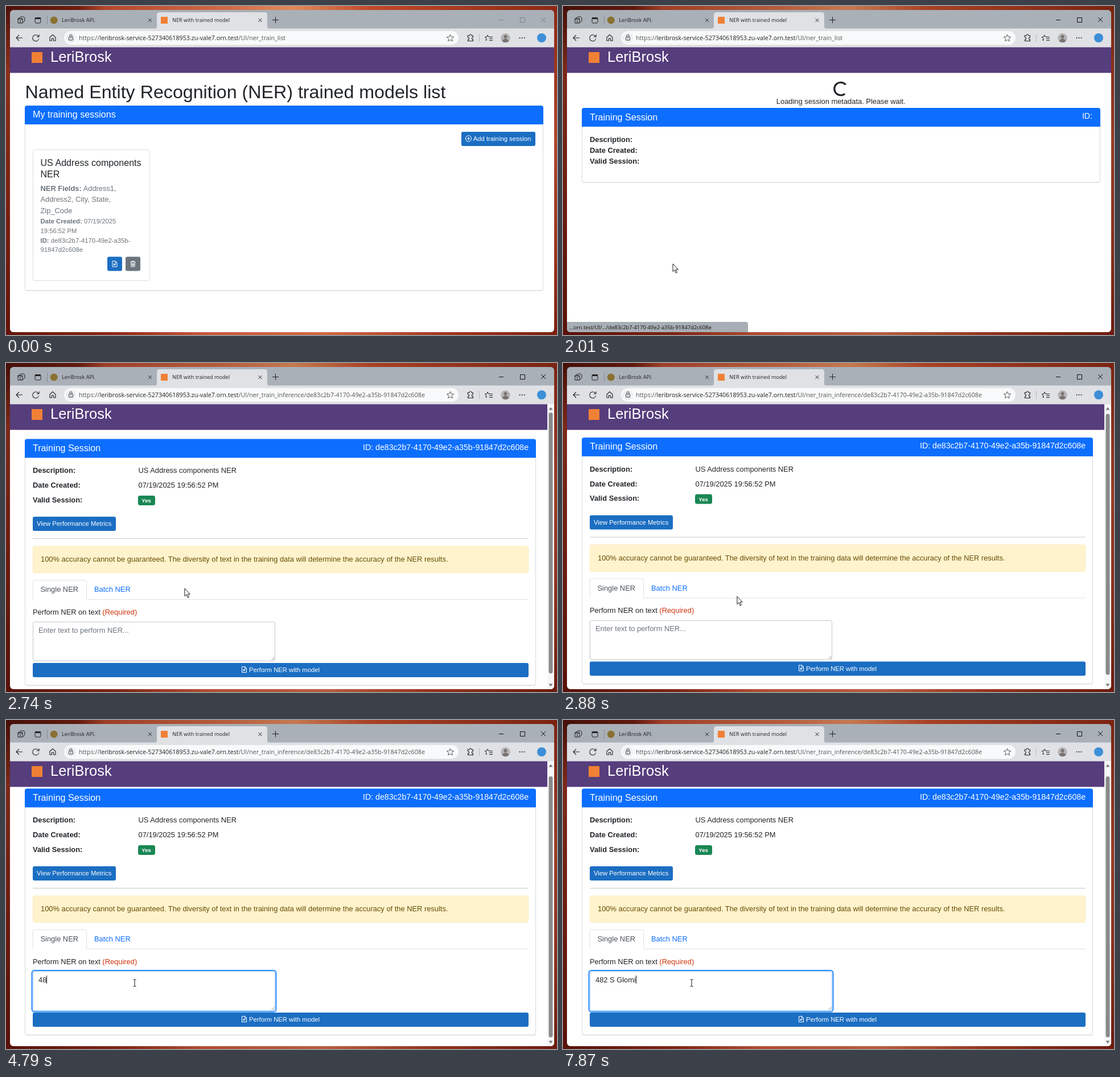
Recreate the animation shown at these times as an HTML page. Size 968x578 px, loop 8 s.

```html
<!DOCTYPE html>
<html lang="en">
<head>
<meta charset="utf-8">
<title>Training session demo</title>
<style>
html, body { margin: 0; width: 100%; height: 100%; overflow: hidden; background: #8c2f1c; }
svg { display: block; width: 968px; height: 578px; }
text { font-family: "Liberation Sans", Arial, sans-serif; white-space: pre; }
.ui { font-family: "Open Sans", "Noto Sans", sans-serif; }
.b { font-weight: bold; }
</style>
</head>
<body>
<svg id="stage" viewBox="0 0 968 578" xmlns="http://www.w3.org/2000/svg"></svg>
<script>
const LOOP = 8000;
const BRAND = 'LeriBrosk';
const HOST = 'leribrosk-service-527340618953.zu-vale7.orn.test';
const ID_HEAD = 'de83c2b7-4170-49e2-a35b-', ID_TAIL = '91847d2c608e';
const ID = ID_HEAD + ID_TAIL;
const INK = '#212529', BLUE = '#1b6ec2', HEAD = '#0d6efd', MUTED = '#6c757d';
const BODY = 12.88, TITLE = 16.1, SMALL = 11.27;

// Markup helpers
const rect = (x, y, w, h, fill, r = 0, more = '') =>
  `<rect x="${x}" y="${y}" width="${w}" height="${h}" rx="${r}" fill="${fill}" ${more}/>`;
const text = (x, y, size, str, fill = INK, more = '') =>
  `<text x="${x}" y="${y}" font-size="${size}" fill="${fill}" ${more}>${str}</text>`;
const bold = (x, y, size, str, fill = INK) => text(x, y, size, str, fill, 'class="b"');
const ui = (x, y, size, str, fill = '#222', more = '') =>
  text(x, y, size, str, fill, `class="ui" ${more}`);
const line = (d, color = '#222', w = 1, more = '') =>
  `<path d="${d}" fill="none" stroke="${color}" stroke-width="${w}" ${more}/>`;
const circle = (x, y, r, fill, more = '') =>
  `<circle cx="${x}" cy="${y}" r="${r}" fill="${fill}" ${more}/>`;
const group = (id, inner, more = '') => `<g id="${id}" ${more}>${inner}</g>`;
const gradient = (id, dir, stops) => `<linearGradient id="${id}" x1="0" y1="0" ${dir}="1" ${dir === 'y2' ? 'x2="0"' : 'y2="0"'}>` +
  stops.map(([o, c]) => `<stop offset="${o}" stop-color="${c}"/>`).join('') + '</linearGradient>';
const cross = (x, y, s, color) =>
  line(`M${x - s} ${y - s}l${2 * s} ${2 * s}m0 ${-2 * s}l${-2 * s} ${2 * s}`, color);
const docIcon = (x, y) =>
  line(`M${x} ${y}h5.2l2.8 2.8v7.2h-8zM${x + 5} ${y}v3h3M${x + 2.5} ${y + 8}v-3h3v1.6h-3`, '#fff', 1);
const panel = (x, y, w, h) =>
  rect(x - .5, y + 1, w + 1, h + 1, '#000', 4, 'opacity=".06"') +
  rect(x, y, w, h, '#fff', 3.5, 'stroke="#d9dbdd"') +
  `<path d="M${x - .5} ${y + 32.5}v-29q0-4 4-4h${w - 7}q4 0 4 4v29z" fill="${HEAD}"/>`;

const wallpaper =
  rect(0, 0, 968, 578, 'url(#side)') +
  rect(0, 0, 968, 8, 'url(#top)') +
  rect(0, 572, 968, 6, 'url(#bottom)') +
  rect(962, 0, 6, 578, 'url(#right)');

const tabs =
  rect(7, 7, 956, 33, '#a9b0b7') +
  line('M22 22l4-3h5l2 2v5l-4 4M21 22h8v8h-8zM21 24l4-2 4 2M25 24v6', '#222') +
  rect(51, 20.5, 10, 9.5, 'none', 2, 'stroke="#222"') + rect(51, 20, 10, 3, '#222', 1) +
  line('M72.5 17v16', '#858b92') +
  circle(84.2, 25, 6.5, '#8a7032') +
  ui(98, 28.3, 9.2, BRAND + ' API.') + cross(253, 25, 3, '#333') +
  '<path d="M261 40q4 0 4-4V16q0-5 5-5h184q5 0 5 5v20q0 4 4 4z" fill="#dfe1e5"/>' +
  rect(272, 19, 12, 12, '#f08035') +
  ui(292, 28.3, 9.2, 'NER with trained model') + cross(446.5, 25, 3, '#222') +
  line('M468 24.5h11m-5.5-5.5v11', '#222') +
  group('controls', '<path d="M866 24.5h8M903.5 20.5h8v8h-8zM940 20l8 8m0-8l-8 8"/>', 'fill="none"');

const toolbar =
  rect(7, 39.5, 956, 33, '#dfe1e5') +
  line('M29 56H18m5-5l-5 5 5 5', '#222', 1.1) +
  line('M57 53.5a5.5 5.5 0 1 0 .6 4M58 50v4h-4', '#222', 1.1) +
  line('M77 55l5-4.5 5 4.5v6h-3.4v-4h-3.2v4h-3.4z', '#222', 1.1) +
  rect(102, 44, 693, 24, '#f8f9fa', 12) +
  circle(114, 56, 9, '#eceef0') +
  rect(110.5, 54.5, 7, 5.5, 'none', 1, 'stroke="#333"') + line('M112 54v-1.5a2 2 0 0 1 4 0v1.5', '#333') + circle(114, 57.2, .8, '#333') +
  ui(128, 59.6, 10.69, `https://<tspan fill="#222">${HOST}</tspan><tspan id="path"></tspan>`, '#555') +
  line('M780.5 50l1.8 4 4.3.5-3.2 2.9.9 4.3-3.8-2.2-3.8 2.2.9-4.3-3.2-2.9 4.3-.5z', '#555') +
  line('M811 52h3a2 2 0 0 1 4 0h2.5v3a2 2 0 0 0 0 4v2.5h-9v-2.5a2 2 0 0 0 0-4z', '#222', 1.1) +
  line('M831.5 49v14', '#b5b9be') +
  line('M846 51l1.4 3 3.2.4M846 51l-1.5 3.2-3.3.4 2.6 2.3-.7 3.6 2-1.2M849 54.5h6m-6 3h6m-6 3h6', '#222') +
  circle(877.5, 56.3, 8.3, '#b6b4b4') + circle(877.5, 53.8, 2.9, '#77716f') +
  '<path d="M872 62a5.5 4.4 0 0 1 11 0q-5.500 4-11 0z" fill="#77716f"/>' +
  [902.500, 906.5, 910.5].map(x => circle(x, 56, 1, '#222')).join('') +
  circle(941, 56, 8, '#3c8fd8');

const fact = (y, label, value = '') => bold(47, y, BODY, label) + text(232.5, y, BODY, value);

const listPage =
  text(33.500, 162.3, 32.2, 'Named Entity Recognition (NER) trained models list') +
  panel(33.5, 175.5, 910, 324) +
  text(47, 196.3, TITLE, 'My training sessions', '#fff') +
  rect(800, 221, 130, 25, BLUE, 3) +
  circle(812.5, 233, 5.2, 'none', 'stroke="#fff"') + line('M809.5 233h6m-3-3v6', '#fff') +
  text(820.8, 237.2, SMALL, 'Add training session', '#fff') +
  rect(47.5, 252.5, 205, 230, '#fff', 3.5, 'stroke="#dcdddf"') +
  text(60.5, 281, TITLE, 'US Address components') + text(60.5, 300.5, TITLE, 'NER') +
  text(60.5, 325, BODY, '<tspan class="b">NER Fields:</tspan> Address1,', MUTED) +
  text(60.5, 344.3, BODY, 'Address2, City, State,', MUTED) +
  text(60.5, 363.6, BODY, 'Zip_Code', MUTED) +
  text(60.5, 381.7, SMALL, '<tspan class="b">Date Created:</tspan> 07/19/2025', MUTED) +
  text(60.5, 398.6, SMALL, '19:56:52 PM', MUTED) +
  text(60.5, 415.5, SMALL, `<tspan class="b">ID:</tspan> ${ID_HEAD}`, MUTED) +
  text(60.5, 432.4, SMALL, ID_TAIL, MUTED) +
  rect(178, 440.5, 26, 25, BLUE, 3, 'id="open"') + docIcon(187, 448) +
  rect(210, 440.5, 26, 25, MUTED, 3) +
  line('M218.500 449.500h9m-6 0v-1.500h3v1.500M219.500 450l.5 8h6l.5-8M221.500 451.500v5m1.500-5v5m1.500-5v5', '#fff', 1);

const loadingPage =
  line('M495.950 137.550A11.250 11.250 0 1 0 495.950 153.450', INK, 3.2, 'id="spinner"') +
  text(488.3, 172, BODY, 'Loading session metadata. Please wait.', INK, 'text-anchor="middle"') +
  panel(33.5, 179.5, 910, 130) +
  text(47, 200.5, TITLE, 'Training Session', '#fff') +
  text(930, 198, 14.15, 'ID:', '#fff', 'text-anchor="end"') +
  fact(238.5, 'Description:') + fact(258, 'Date Created:') + fact(277.3, 'Valid Session:');

const sessionPage =
  panel(33.5, 134, 897, 432) +
  text(47, 155, TITLE, 'Training Session', '#fff') +
  text(918, 153, 14.15, 'ID: ' + ID, '#fff', 'text-anchor="end"') +
  fact(193.3, 'Description:', 'US Address components NER') +
  fact(219.2, 'Date Created:', '07/19/2025 19:56:52 PM') +
  fact(245, 'Valid Session:') +
  rect(232, 233, 30, 17, '#198754', 3.5) + bold(238.3, 245.2, 9.66, 'Yes', '#fff') +
  rect(47, 270, 146, 25, BLUE, 3) + text(54, 286.3, SMALL, 'View Performance Metrics', '#fff') +
  line('M47 308.500H918', '#c7c8ca') +
  rect(47.5, 322, 870, 46.5, '#fff3cd', 3, 'stroke="#fcecb9"') +
  text(61, 349.3, BODY, '100% accuracy cannot be guaranteed. The diversity of text in the training data will determine the accuracy of the NER results.', '#664d03') +
  line('M47 415.500V385q0-3.500 3.500-3.500H138q3.500 0 3.500 3.500V415.500H918', '#dee2e6') +
  text(60.5, 402.3, BODY, 'Single NER', '#495057') + text(155, 402.3, BODY, 'Batch NER', HEAD) +
  text(47, 442, BODY, 'Perform NER on text <tspan fill="#d0340f">(Required)</tspan>') +
  rect(45.5, 453, 429, 72.5, 'none', 4.5, 'id="ring" stroke="#258cfb" stroke-width="2"') +
  rect(47.5, 455, 425, 68.5, '#fff', 3, 'id="area" stroke="#c4c8cc"') +
  line('M466.500 522l5-5m-2 5l2-2', '#777', .8) +
  text(57, 473.7, BODY, 'Enter text to perform NER...', MUTED, 'id="hint"') +
  text(57, 473.7, BODY, '', INK, 'id="typed"') +
  rect(57, 462, 1, 14, '#111', 0, 'id="caret"') +
  rect(47, 527, 871, 25, BLUE, 3) + docIcon(414.5, 533.5) +
  text(427, 543.3, SMALL, 'Perform NER with model', '#fff');

const header =
  rect(7, 72, 956, 45.5, '#563d7c') +
  rect(45, 81, 19, 19, '#f08035') +
  text(78, 98.3, 25.5, BRAND, '#fff');

const scrollbar =
  rect(951, 72, 12, 501, '#f7f7f7') +
  '<path d="M953.500 82.500l3.500-5 3.500 5zM953.500 563.500l3.500 5 3.500-5z" fill="#7c7c7c"/>' +
  rect(953.5, 87, 7, 458.5, '#8a8a8a', 3.5, 'id="thumb"');

const status =
  '<path d="M7 555H321q4 0 4 4V573H7z" fill="#a8aeb5"/>' +
  ui(11, 567.6, 9.3, `...orn.test/UI/.../${ID}`, '#111', 'id="link"');

const pointers =
  group('arrow', '<path d="M0 0V13.500L3.100 10.700 5.300 16 7.400 15.100 5.200 9.900H9.400Z"/>') +
  group('hand', '<path d="M-1.300 1Q-1.300-.4 0-.4Q1.300-.4 1.300 1V5.500Q2.500 4.800 3.600 6Q5 5.400 6 6.800Q8.200 6.300 8.200 8.600V11.500Q8.200 14 6.600 16V17H-.6V16Q-3.400 13-5 10.200Q-5.200 8-3 8.600L-1.300 10.200Z"/>' +
    line('M1.300 5.500V9M3.700 6V9M6 6.800V9.400', '#000', .8)) +
  group('beam', line('M-2.500-6H-.8L0-5.300.8-6H2.500M0-5.300V5.300M-2.500 6H-.8L0 5.300.8 6H2.500', '#111'));

document.getElementById('stage').innerHTML =
  '<defs>' +
  gradient('top', 'x2', [[0, '#4f120a'], [.13, '#6d1d10'], [.18, '#b5472c'], [.4, '#d06a45'], [.52, '#e08a5c'], [.66, '#c04a28'], [1, '#8c2814']]) +
  gradient('bottom', 'x2', [[0, '#64140a'], [.2, '#8e2a16'], [.36, '#c9583a'], [.58, '#d06a45'], [.78, '#a63a20'], [1, '#7b1f10']]) +
  gradient('side', 'y2', [[0, '#4f120a'], [.2, '#8c2f1c'], [.6, '#7a2012'], [1, '#64140a']]) +
  gradient('right', 'y2', [[0, '#8c2814'], [.4, '#b0452a'], [.75, '#9a341d'], [1, '#7b1f10']]) +
  `<clipPath id="frame">${rect(7, 7, 956, 566, '#000', 6)}</clipPath></defs>` +
  wallpaper +
  rect(0, 0, 968, 578, '#000', 0, 'id="shade"') +
  group('win',
    rect(7, 72, 956, 501, '#fff') +
    group('list', listPage) + group('loading', loadingPage) + group('session', sessionPage) +
    header + group('bar', scrollbar) + tabs + toolbar + group('status', status),
    'clip-path="url(#frame)"') +
  group('pointer', pointers, 'fill="#fff" stroke="#000" stroke-width=".9"');

const el = {};
document.querySelectorAll('[id]').forEach(n => el[n.id] = n);

const show = (node, on) => node.setAttribute('display', on ? 'inline' : 'none');
const set = (node, name, value) => node.setAttribute(name, value);
const ramp = (t, a, b) => Math.min(1, Math.max(0, (t - a) / (b - a)));
const ease = k => k * k * (3 - 2 * k);
const mix = (a, b, k) => a + (b - a) * k;

// Pointer path: time, x, y
const PATH = [
  [130, 651, 549], [400, 430, 508], [620, 240, 469], [780, 174, 454], [890, 188, 449.5],
  [1020, 188, 449.5], [1790, 193, 453], [2260, 193, 453], [2500, 268, 414], [2740, 314, 396],
  [2880, 306, 410], [3020, 287, 431], [3200, 245, 450], [3440, 213, 462], [3580, 213, 462], [3720, 226, 462]
];
function pointerAt(t) {
  const i = PATH.findIndex(p => p[0] > t);
  if (i < 0) return PATH[PATH.length - 1].slice(1);
  if (i === 0) return PATH[0].slice(1);
  const [a, b] = [PATH[i - 1], PATH[i]], k = ramp(t, a[0], b[0]);
  return [mix(a[1], b[1], k), mix(a[2], b[2], k)];
}

const ACTIVE = 1860, LOADING = 2000, READY = 2060, FOCUS = 3440, BLINK = 550;
const ENTRY = '482 S Glomi';
const KEYS = [4520, 4790, 4930, 5260, 5660, 5990, 6320, 6450, 6920, 7800, 7870];

function draw(t) {
  const isList = t < LOADING, isReady = t >= READY;
  show(el.list, isList);
  show(el.loading, !isList && !isReady);
  show(el.session, isReady);
  show(el.bar, isReady);
  el.path.textContent = isReady ? '/UI/ner_train_inference/' + ID : '/UI/ner_train_list';
  set(el.controls, 'stroke', t < ACTIVE ? '#7d838a' : '#111');
  set(el.shade, 'opacity', t < ACTIVE ? 0 : .12);

  show(el.status, t >= 1015 && !isReady);
  set(el.status, 'opacity', mix(.88, 1, ramp(t, 1020, 1300)));
  set(el.link, 'opacity', mix(.72, 1, ramp(t, 1020, 1300)));

  const hover = ramp(t, 800, 890);
  set(el.open, 'fill', `rgb(${mix(27, 11, hover)},${mix(110, 94, hover)},${mix(194, 215, hover)})`);
  set(el.spinner, 'transform', `rotate(${(t - LOADING) * 360 / 750} 488 145.5)`);

  const scroll = ease(ramp(t, 2830, 3010));
  set(el.session, 'transform', `translate(0 ${-13 * scroll})`);
  set(el.thumb, 'y', 87 + 12 * scroll);

  const count = KEYS.filter(k => t >= k).length;
  const since = t - (count ? KEYS[count - 1] : FOCUS);
  el.typed.textContent = ENTRY.slice(0, count);
  show(el.hint, !count);
  show(el.caret, since >= 0 && since % (2 * BLINK) < BLINK);
  set(el.caret, 'x', Math.round(57 + (count ? el.typed.getComputedTextLength() : 0)));
  const focus = ramp(t, FOCUS, FOCUS + 150);
  set(el.ring, 'opacity', focus);
  set(el.area, 'stroke', focus > .5 ? '#a9cbf7' : '#c4c8cc');

  const [x, y] = pointerAt(t);
  const onButton = isList && t >= 830;
  const onText = isReady && y > 441 && t > 3020;
  show(el.pointer, t >= 130);
  set(el.pointer, 'transform', `translate(${x} ${y})`);
  show(el.hand, onButton);
  show(el.beam, onText);
  show(el.arrow, !onButton && !onText);
}

const start = performance.now();
function tick() {
  draw((performance.now() - start) % LOOP);
  requestAnimationFrame(tick);
}
tick();
</script>
</body>
</html>
```
